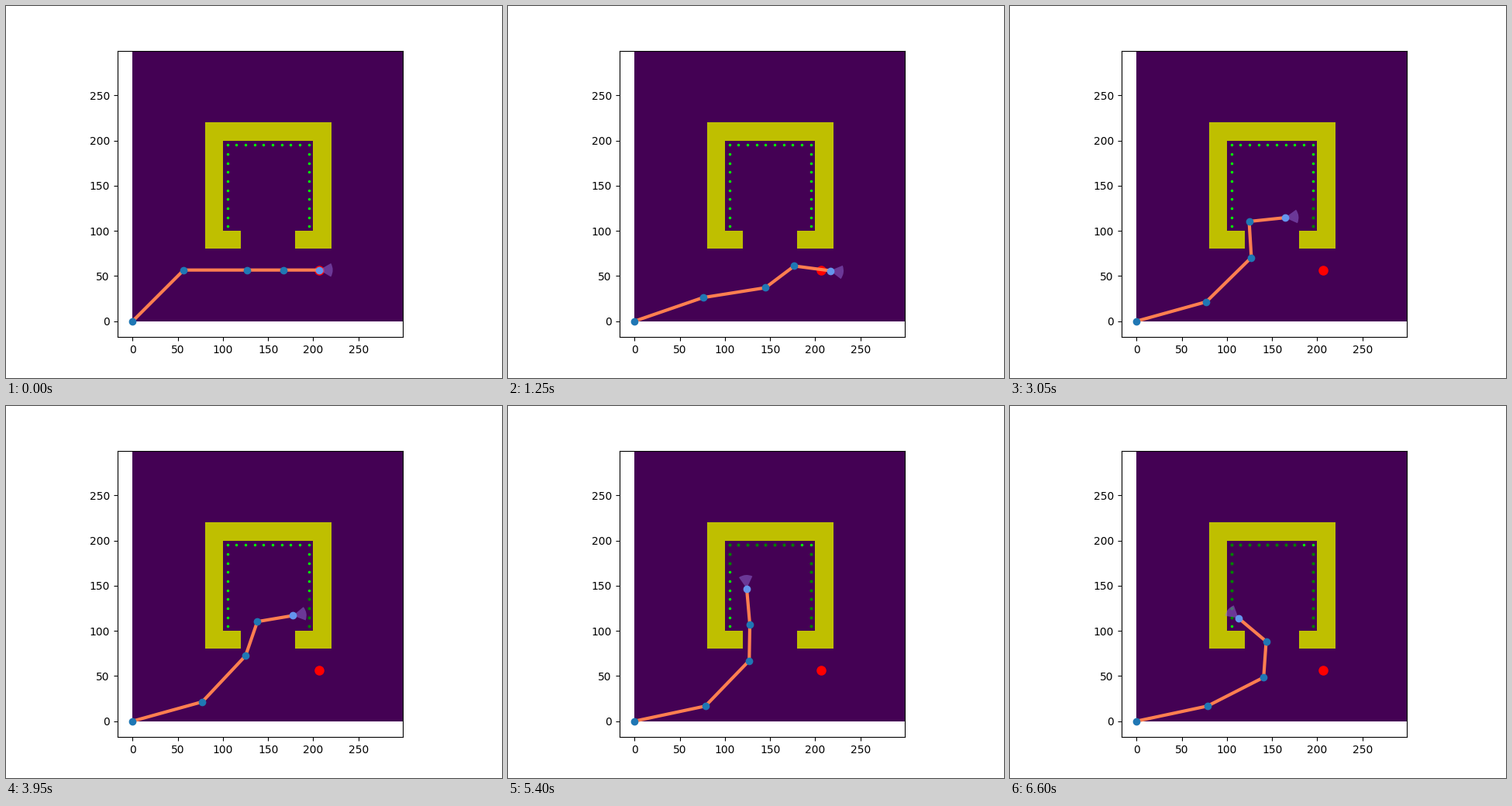
These frames come from a looping animation (640 px wide and 480 px high, 6650 ms). A matplotlib script:

```python
import numpy as np
import matplotlib.pyplot as plt
from matplotlib.animation import FuncAnimation
from matplotlib.patches import Rectangle, Wedge

FRAMES, INTERVAL = 133, 50
LINKS = np.array([80, 70, 40, 40])
VIEW_RANGE, VIEW_HALF = 59, 33

# Key poses: frame -> relative joint angles in degrees, linear in between
POSES = {
    0: (45, -45, 0, 0),
    8: (35, -23, 0, 0),
    25: (19, -10, 28, -44.5),
    48: (20, 10, 33, -100),
    61: (15.5, 29, 49, -87.5),
    81: (15.5, 31.5, 21.5, -58.5),
    108: (12, 34, 43, 6),
    123: (12, 15, 50, 54),
    132: (12, 15, 59, 54),
}


def pose(i):
    """Joint positions and heading of the last link."""
    joint_angles = zip(*POSES.values())
    angles = np.cumsum([np.interp(i, list(POSES), q) for q in joint_angles])
    rad = np.radians(angles)
    xs = np.append(0, np.cumsum(LINKS * np.cos(rad)))
    ys = np.append(0, np.cumsum(LINKS * np.sin(rad)))
    return xs, ys, angles[-1]


# Inspection points along the left, top and right inner walls
lo, hi = 105, 195
side = range(lo, hi + 1, 10)
dots = np.array([(x, y) for x in side for y in side
                 if x in (lo, hi) or y == hi])


def visible(i):
    """Points inside the view cone of the tip."""
    xs, ys, heading = pose(i)
    dx, dy = dots[:, 0] - xs[-1], dots[:, 1] - ys[-1]
    off = (np.degrees(np.arctan2(dy, dx)) - heading + 180) % 360 - 180
    return (np.hypot(dx, dy) < VIEW_RANGE) & (np.abs(off) <= VIEW_HALF)


seen = np.logical_or.accumulate([visible(i) for i in range(FRAMES)])

fig, ax = plt.subplots(figsize=(6.4, 4.8), dpi=100)
floor = plt.get_cmap("viridis")(0)
ax.imshow(np.zeros((300, 300)), origin="lower", vmin=0, vmax=1, cmap="viridis")


def box(x, y, w, h, color):
    ax.add_patch(Rectangle((x, y), w, h, color=color, lw=0, zorder=1))


# A thick-walled room with a door at the bottom
box(80, 80, 140, 140, "y")
box(100, 100, 100, 100, floor)
box(120, 80, 60, 20, floor)


def markers(color, size, z, shape="o"):
    return ax.plot([], [], shape, color=color, ms=size, zorder=z)[0]


fresh = markers("lime", 3, 2, ".")
done = markers("green", 4, 2, ".")
start = markers("red", 8, 3)
joints = markers("tab:blue", 6, 6)
tip = markers("cornflowerblue", 6, 7)
arm, = ax.plot([], [], color="coral", lw=3, zorder=5)
cone = ax.add_patch(Wedge((0, 0), 15, -30, 30, fc="mediumpurple",
                          ec="none", alpha=0.5, zorder=4))

xs, ys, _ = pose(0)
start.set_data(xs[-1:], ys[-1:])

ax.set_xlim(-17, 299.5)
ax.set_ylim(-17.67, 299.5)
ax.set_xticks(range(0, 300, 50))
ax.set_yticks(range(0, 300, 50))


def update(i):
    xs, ys, heading = pose(i)
    arm.set_data(xs, ys)
    joints.set_data(xs[:-1], ys[:-1])
    tip.set_data(xs[-1:], ys[-1:])
    cone.set_center((xs[-1], ys[-1]))
    cone.set_theta1(heading - 30)
    cone.set_theta2(heading + 30)
    fresh.set_data(*dots[~seen[i]].T)
    done.set_data(*dots[seen[i]].T)
    return arm, joints, tip, cone, fresh, done


anim = FuncAnimation(fig, update, frames=FRAMES, interval=INTERVAL,
                     repeat=True, repeat_delay=0)
plt.show()
```
